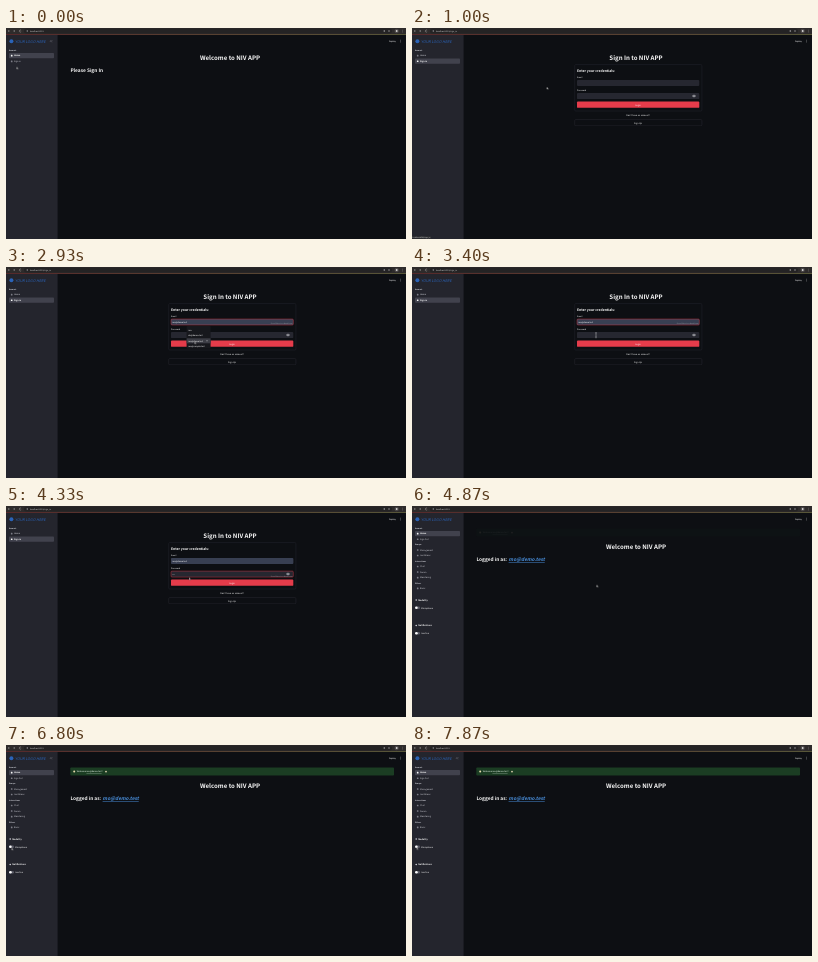
Animation of 400 by 211 pixels, one loop 8 s. Source, as an HTML page:

```html
<!DOCTYPE html>
<html lang="en">
<head>
<meta charset="utf-8">
<title>Sign-in walkthrough</title>
<style>
  html, body { margin: 0; width: 100%; height: 100%; overflow: hidden; background: #0d0f13; }
  svg { display: block; width: 100%; height: 100%; }
  text {
    font-family: "Noto Sans CJK JP", "Noto Sans CJK SC", "Noto Sans", sans-serif;
    text-rendering: geometricPrecision;
    white-space: pre;
  }
</style>
</head>
<body>
<svg id="stage" viewBox="0 0 400 211" xmlns="http://www.w3.org/2000/svg"></svg>
<script>
const LOOP = 8000;
const SIGN_IN = 470, LOGGED_IN = 4730;
const APP = 'NIV APP', EMAIL = 'mo@demo.test';
const WHITE = '#fafafa', GREY = '#d2d3da', FIELD = '#262730', FILLED = '#383f52', RED = '#e53c4b';

// Drawing helpers return SVG markup.
const text = (x, y, str, size, fill = WHITE, extra = '') =>
  `<text x="${x}" y="${y}" font-size="${size}" fill="${fill}" ${extra}>${str}</text>`;
const bold = (x, y, str, size, fill, extra = '') =>
  text(x, y, str, size, fill, 'font-weight="700" ' + extra);
const rect = (x, y, w, h, fill, r = 0, extra = '') =>
  `<rect x="${x}" y="${y}" width="${w}" height="${h}" rx="${r}" fill="${fill}" ${extra}/>`;
const dot = (x, y, r, fill) => `<circle cx="${x}" cy="${y}" r="${r}" fill="${fill}"/>`;
const line = (d, color, w = 0.4) =>
  `<path d="${d}" fill="none" stroke="${color}" stroke-width="${w}"/>`;
const group = (id, ...parts) => `<g id="${id}">${parts.join('')}</g>`;
const outline = (x, y, w, h, color) =>
  rect(x, y, w, h, 'none', 1, `stroke="${color}" stroke-width=".4"`);
const MID = 'text-anchor="middle"', END = 'text-anchor="end"', MEDIUM = 'font-weight="500"';

const title = (str, y) => bold(224, y, str, 6.1, WHITE, MID);
const section = (y, str) => bold(3, y + 0.7, str, 1.85, GREY);
const navItem = (y, str, on) =>
  (on ? rect(3, y - 2.6, 45, 5.2, '#41424d', 0.8) : '') +
  rect(4.9, y - 0.8, 1.6, 1.6, on ? WHITE : '#7d7e88', 0.5) +
  (on ? bold : text)(8, y + 0.8, str, 2.15, on ? WHITE : GREY);
const toggle = (y, str) =>
  rect(3, y - 1.3, 5, 2.6, '#5a5b66', 1.3) + dot(4.4, y, 1.3, WHITE) +
  text(9, y + 0.8, str, 2.15, WHITE, MEDIUM);
const caption = (y, str) =>
  dot(4.2, y, 0.8, GREY) + bold(6.2, y + 0.8, str, 2.2);
const hint = y => text(286.4, y, 'Press Enter to submit form', 1.75, '#a5a0a6', END);
const eye = () =>
  line('M280.4 68q1.6-2 3.2 0q-1.6 2-3.2 0z', '#e6e6ea', 0.5) + dot(282, 68, 0.5, '#e6e6ea');

const chrome = [
  '<linearGradient id="warm"><stop stop-color="#ff4b4b"/><stop offset="1" stop-color="#fffd80"/></linearGradient>',
  rect(0, 6.4, 400, 0.6, 'url(#warm)', 0, 'opacity=".7"'),
  rect(0, 0, 400, 6.4, '#2e2b2b'),
  rect(18, 0.6, 368, 5, '#242324', 2.5),
  line('M4 3H2M2.8 2.2L2 3l.8.8M7 3h2M8.2 2.2L9 3l-.8.8', '#a9a6a6'),
  line('M15 2.3a1 1 0 1 0 .2 1.2', '#c9c6c6'),
  dot(21.3, 3, 0.7, '#98969a'),
  dot(378.3, 3, 0.8, '#aaa7a8'),
  line('M382.2 3h1.6M383 2.2v1.6', '#aaa7a8', 0.5),
  rect(388.5, 0.8, 4.4, 4.4, '#4a4747', 2.2),
  dot(390.7, 3, 0.9, '#d8d6d6'),
  [2, 3, 4].map(y => dot(396.6, y, 0.3, '#c4c1c1')).join(''),
  text(383, 13.8, 'Deploy', 2.1, WHITE, MEDIUM),
  [12, 13, 14].map(y => dot(394.3, y, 0.3, WHITE)).join('')
].join('');

const url = (id, path) => group(id, text(24, 3.8, 'localhost:8501' + path, 2, '#d6d4d4'));

const sidebar = [
  rect(0, 7, 51.6, 204, '#24252d'),
  dot(5.4, 13.2, 2, '#2a63b8'),
  text(9, 14.6, 'YOUR LOGO HERE', 3.7, '#2a63b8', 'font-style="italic"'),
  section(22, 'Account')
].join('');

const memberNav = [
  navItem(27.6, 'Home', true), navItem(33.2, 'Sign Out'),
  section(38.7, 'Groups'), navItem(44, 'Management'), navItem(49.5, 'Invitations'),
  section(55, 'Interactions'), navItem(60.5, 'Chat'), navItem(66, 'Forum'),
  navItem(71.6, 'Monitoring'), section(77, 'Others'), navItem(82.4, 'Basic'),
  caption(94, 'Modality'), toggle(101.7, 'Microphone'),
  caption(119.5, 'Notifications'), toggle(127.2, 'Inactive')
].join('');

const form = [
  title('Sign In to ' + APP, 31.6),
  outline(162.7, 36.6, 127.2, 46.4, '#2a2c35'),
  bold(165, 44, 'Enter your credentials:', 3.4),
  text(165, 49.8, 'Email', 2),
  rect(165, 52, 122.3, 6, FIELD, 0.9),
  text(165, 63.2, 'Password', 2),
  rect(165, 65.1, 122.3, 6, FIELD, 0.9),
  rect(165, 73.6, 122.3, 6.2, RED, 0.9),
  text(226, 77.5, 'Login', 2.2, WHITE, MID),
  text(226, 87.7, "Don't have an account?", 2.2, WHITE, MID),
  outline(162.7, 91.6, 127.2, 6.2, '#30323b'),
  text(226, 95.6, 'Sign Up', 2.2, WHITE, MID),
  group('emailFilled', rect(165, 52, 122.3, 6, FILLED, 0.9), text(166.3, 55.8, EMAIL, 2.1)),
  group('emailFocus', outline(165, 52, 122.3, 6, RED)),
  group('emailCaret', rect(166.3, 53.4, 0.35, 3.2, WHITE)),
  group('emailHint', hint(57.4)),
  group('passFocus', outline(165, 65.1, 122.3, 6, RED)),
  group('passHint', hint(70.7)),
  group('dotsShort', text(166.3, 68.9, '•', 2.3)),
  group('dotsLong', text(166.3, 68.9, '•••', 2.3)),
  eye(),
  group('pressed', rect(165, 73.6, 122.3, 6.2, '#b82f3c', 0.9), text(226, 77.5, 'Login', 2.2, WHITE, MID)),
  group('emailMenu',
    rect(180.6, 59, 24, 22.6, '#17181d', 0.8),
    text(182.3, 63.8, 'mo', 2.1),
    text(182.3, 69.4, 'do@demo.test', 2.1),
    group('menuHover', rect(180.6, 71.3, 24, 5, '#3c3d45'), dot(201, 73.8, 0.5, GREY)),
    text(182.3, 74.6, EMAIL, 2.1),
    text(182.3, 80, 'mo@sample.test', 2.1)),
  group('passMenu',
    rect(180.6, 71.6, 24, 9.6, '#17181d', 0.8),
    text(182.3, 75.4, EMAIL, 2.1),
    text(182.3, 79.6, 'Manage…', 2.1))
].join('');

const member = [
  group('toast',
    rect(64.3, 22.6, 323.7, 7.8, '#1b3d23', 0.9),
    dot(68.2, 26.6, 1, '#e8dcae'),
    text(70.7, 27.4, `Welcome <tspan text-decoration="underline">${EMAIL}</tspan>!`, 2.15, '#eefaf0', MEDIUM),
    dot(100, 26.6, 0.9, '#dccfae')),
  title('Welcome to ' + APP, 43),
  bold(64.4, 55, 'Logged in as:', 4.8),
  bold(96.6, 55, EMAIL, 4.8, '#4b93e2', 'font-style="italic" text-decoration="underline"')
].join('');

stage.innerHTML = [
  rect(0, 0, 400, 211, '#0d0f13'),
  chrome, url('urlHome', ''), url('urlSign', '/sign_in'),
  sidebar,
  group('collapse', line('M45 12.2l-.9 1 .9 1M46.3 12.2l-.9 1 .9 1', '#a4a5ae', 0.3)),
  group('navGuest', navItem(27.6, 'Home', true), navItem(33.4, 'Sign in')),
  group('navSign', navItem(27.6, 'Home'), navItem(33.2, 'Sign in', true)),
  group('navMember', memberNav),
  group('pageGuest', title('Welcome to ' + APP, 31.6), bold(64.4, 44, 'Please Sign In', 4.8)),
  group('pageSign', form),
  group('pageMember', member),
  group('status', rect(0, 208, 19, 3, '#2b2c30'), text(0.4, 210.4, 'localhost:8501/sign_in', 1.7)),
  group('mouse',
    group('arrow', '<path d="M0 0v2.3l.55-.5.4.9.5-.2-.4-.9h.75z" fill="#fff" stroke="#000" stroke-width=".2"/>'),
    group('beam', line('M-.8-2.4h1.6M0-2.4v4.6M-.8 2.2h1.6', '#e8e8e8')))
].join('');

const el = id => document.getElementById(id);
const run = (id, frames) => el(id).animate(frames, { duration: LOOP, iterations: Infinity });

// Hard on/off switching over [from, to) spans.
function show(id, ...spans) {
  const hit = t => spans.some(([a, b]) => t >= a && t < b);
  const times = [...new Set([0, ...spans.flat(), LOOP])].sort((a, b) => a - b);
  run(id, times.map(t => ({
    offset: t / LOOP,
    opacity: hit(t) ? 1 : 0,
    easing: 'steps(1, end)'
  })));
}

const SPANS = {
  urlHome: [[0, SIGN_IN], [LOGGED_IN, LOOP]],
  urlSign: [[SIGN_IN, LOGGED_IN]],
  collapse: [[0, 930], [6330, LOOP]],
  navGuest: [[0, SIGN_IN]],
  navSign: [[SIGN_IN, LOGGED_IN]],
  navMember: [[LOGGED_IN, LOOP]],
  pageGuest: [[0, SIGN_IN]],
  pageSign: [[SIGN_IN, LOGGED_IN]],
  pageMember: [[LOGGED_IN, LOOP]],
  status: [[200, 1130]],
  emailFocus: [[1600, 3600]],
  emailCaret: [[1730, 2270]],
  emailHint: [[2000, 3600]],
  emailMenu: [[2000, 3070]],
  menuHover: [[2800, 3070]],
  emailFilled: [[2800, LOGGED_IN]],
  passFocus: [[3600, LOGGED_IN]],
  passMenu: [[3670, 3930]],
  passHint: [[3930, LOGGED_IN]],
  dotsShort: [[3930, 4000]],
  dotsLong: [[4000, LOGGED_IN]],
  pressed: [[4530, 4670]],
  beam: [[1400, 2670], [3330, 4270]],
  arrow: [[0, 1400], [2670, 3330], [4270, LOOP]]
};
for (const id in SPANS) show(id, ...SPANS[id]);

run('toast', [[0, 0], [4850, 0], [4870, 0.08], [5000, 1], [LOOP, 1]]
  .map(([t, opacity]) => ({ offset: t / LOOP, opacity })));

// Mouse tip: time, x, y
const PATH = [
  [0, 10.5, 38.8], [70, 10.5, 38.8], [330, 10.5, 33.8], [800, 10.5, 33.8], [870, 30, 38],
  [1000, 134.5, 59], [1200, 166, 58], [1400, 178, 56], [1670, 180.5, 56],
  [2400, 180.5, 56], [2600, 180.6, 56.2], [2930, 188.5, 74.6], [3100, 188.5, 74.6],
  [3400, 184, 68.2], [4200, 184, 68.2], [4330, 183, 71.5], [4500, 184.5, 78.5],
  [4870, 184.5, 78.8], [5070, 182, 79.5], [5400, 150, 91], [5870, 93, 95],
  [6300, 48, 99], [6600, 10, 102.5], [6800, 5.5, 102.8], [7100, 6.8, 103],
  [7400, 4.4, 102.2], [7600, 5, 102.6], [7870, 4.6, 102.3], [LOOP, 4.6, 102.3]
];
run('mouse', PATH.map(([t, x, y]) => ({
  offset: t / LOOP, transform: `translate(${x}px, ${y}px)`, easing: 'linear'
})));
</script>
</body>
</html>
```
